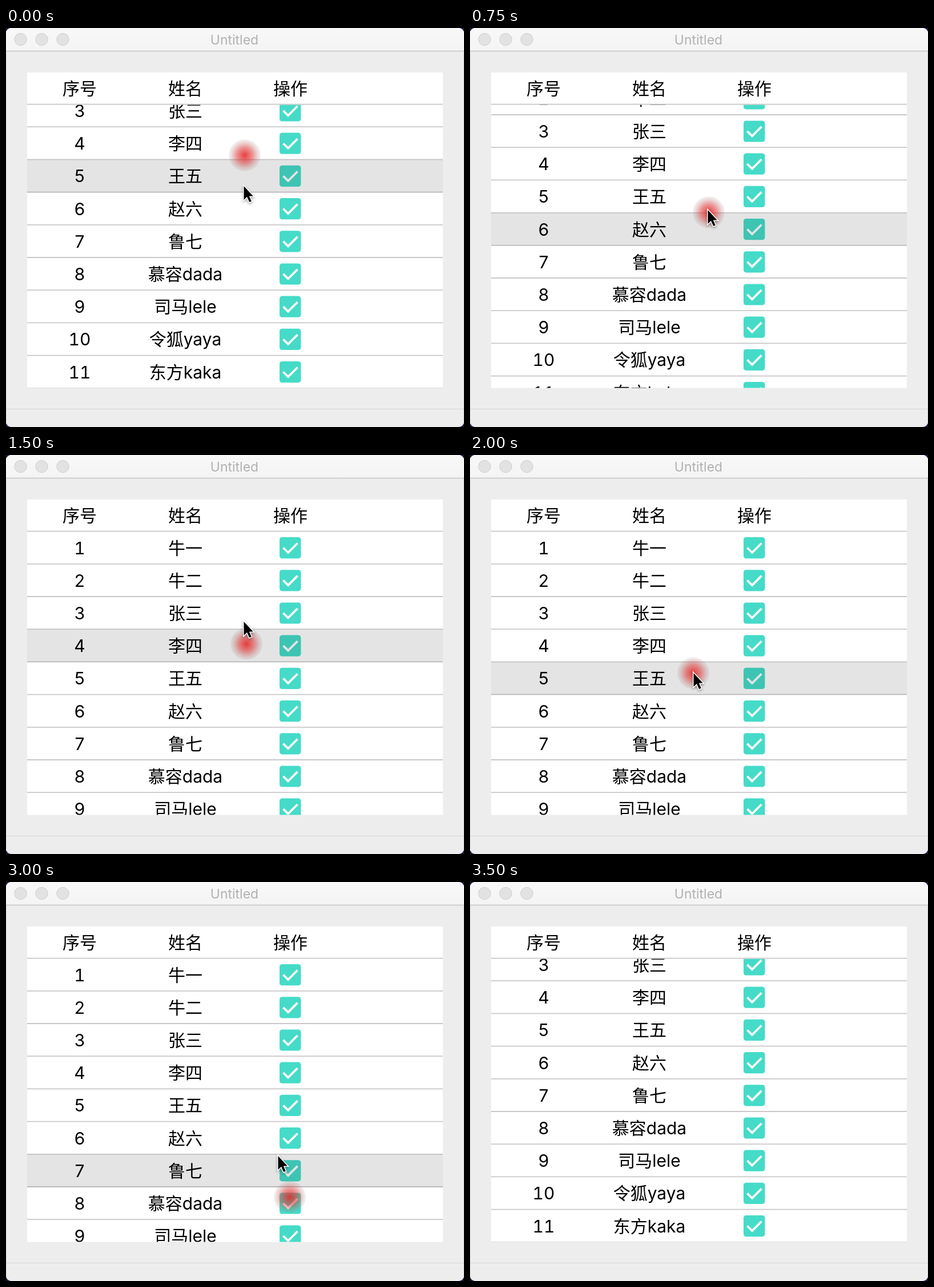
An HTML page that plays this animation: 802 px wide and 699 px high, repeating every 4510 ms.

```html
<!DOCTYPE html>
<html lang="zh">
<head>
<meta charset="utf-8">
<style>
  html, body { margin: 0; width: 100%; height: 100%; overflow: hidden; background: #1d1b3c; }
  svg { display: block; }
  text {
    font: 30px Inter, "Noto Sans CJK SC", "Noto Sans CJK", sans-serif;
    font-feature-settings: "tnum";
    text-anchor: middle;
  }
  #title { font-size: 23px; fill: #b1b1b1; }
  #cursor { filter: drop-shadow(0 2px 2px rgba(0, 0, 0, .35)); }
</style>
</head>
<body>
<svg width="802" height="699" viewBox="0 0 802 699">
  <defs>
    <linearGradient id="bar" x2="0" y2="1">
      <stop stop-color="#f8f8f8"/><stop offset="1" stop-color="#f4f4f4"/>
    </linearGradient>
    <radialGradient id="glow">
      <stop stop-color="#e62828" stop-opacity=".9"/>
      <stop offset=".5" stop-color="#dc3232" stop-opacity=".52"/>
      <stop offset=".85" stop-color="#b45a5a" stop-opacity=".2"/>
      <stop offset="1" stop-color="#967878" stop-opacity=".1"/>
    </radialGradient>
    <clipPath id="view"><path d="M37 134.4H765V630.6H37Z"/></clipPath>
    <clipPath id="window"><rect width="802" height="699" rx="9"/></clipPath>
  </defs>
  <g clip-path="url(#window)">
    <rect width="802" height="699" fill="#ededed"/>
    <rect width="802" height="40" fill="url(#bar)"/>
    <path d="M0 40.5H802" stroke="#cfcfcf" stroke-width="2"/>
    <path d="M.5 41V699M801.5 41V699M0 667.5H802" stroke="#d4d4d4"/>
    <g fill="#e2e2e2" stroke="#cecece">
      <circle cx="25.5" cy="20" r="10.7"/>
      <circle cx="62.5" cy="20" r="10.7"/>
      <circle cx="99.5" cy="20" r="10.7"/>
    </g>
    <text id="title" x="400" y="29">Untitled</text>
  </g>
  <rect x="37" y="78" width="728" height="552.6" fill="#fff"/>
  <text x="129" y="116.5">序号</text>
  <text x="314" y="116.5">姓名</text>
  <text x="498" y="116.5">操作</text>
  <g clip-path="url(#view)"><g id="rows"></g></g>
  <path d="M37 133.6H765" stroke="#c8c8c8" stroke-width="1.8"/>
  <circle id="dot" r="28" fill="url(#glow)"/>
  <path id="cursor" d="M1.5 3V27L7 21.8L11.2 31L14.8 29.4L10.8 20.4H17.8Z"
    stroke="#fff" stroke-width="3" paint-order="stroke"/>
</svg>
<script>
const TOP = 134, PITCH = 57.2, STEP = 250, LOOP = 4510;
const names = ['牛一', '牛二', '张三', '李四', '王五', '赵六', '鲁七',
  '慕容dada', '司马lele', '令狐yaya', '东方kaka'];

// scroll offset, hovered row, cursor x y, dot x y (one pose per step)
const poses = [
  [132, 5, 415, 274, 418, 223],
  [116, 6, 415, 316, 418, 300],
  [114, 6, 415, 316, 418, 323],
  [96, 6, 415, 316, 418, 323],
  [40, 5, 415, 316, 418, 323],
  [0, 4, 416, 325, 422, 332],
  [0, 4, 415, 289, 421, 331],
  [0, 2, 400, 212, 404, 204],
  [0, 5, 390, 379, 391, 382],
  [64, 6, 390, 379, 391, 384],
  [132, 7, 390, 379, 391, 384],
  [0, 6, 436, 450, 430, 450],
  [0, 7, 475, 477, 497, 552],
  [114.4, 7, 452, 384, 455, 388],
  [132, 0]
];

const $ = id => document.getElementById(id);
const place = (el, x, y) => el.setAttribute('transform', `translate(${x} ${y})`);
const show = (el, on) => el.style.display = on ? '' : 'none';

$('rows').innerHTML = names.map((name, i) => `
  <g transform="translate(0 ${TOP + i * PITCH})">
    <text x="129" y="39.5">${i + 1}</text>
    <text x="314" y="39.5">${name}</text>
    <rect x="479" y="10" width="37.4" height="37.2" rx="4.5" fill="#45dbc8"/>
    <path d="M485.5 28.5L494 37L510.5 20.5" fill="none" stroke="#fff" stroke-width="3.8"/>
    <path d="M37 56.8H765" stroke="#c8c8c8" stroke-width="1.8"/>
  </g>`).join('') +
  `<rect id="hover" x="37" width="728" height="${PITCH}" opacity=".106"/>`;

function draw(now) {
  const step = Math.min(Math.floor(now % LOOP / STEP), poses.length - 1);
  const [scroll, row, cx, cy, dx, dy] = poses[step];
  place($('rows'), 0, -scroll);
  $('hover').setAttribute('y', TOP + (row - 1) * PITCH);
  for (const id of ['hover', 'cursor', 'dot']) show($(id), row);
  if (row) {
    place($('cursor'), cx, cy);
    place($('dot'), dx, dy);
  }
}

const start = performance.now();
function tick() {
  draw(performance.now() - start);
  requestAnimationFrame(tick);
}
tick();
</script>
</body>
</html>
```
